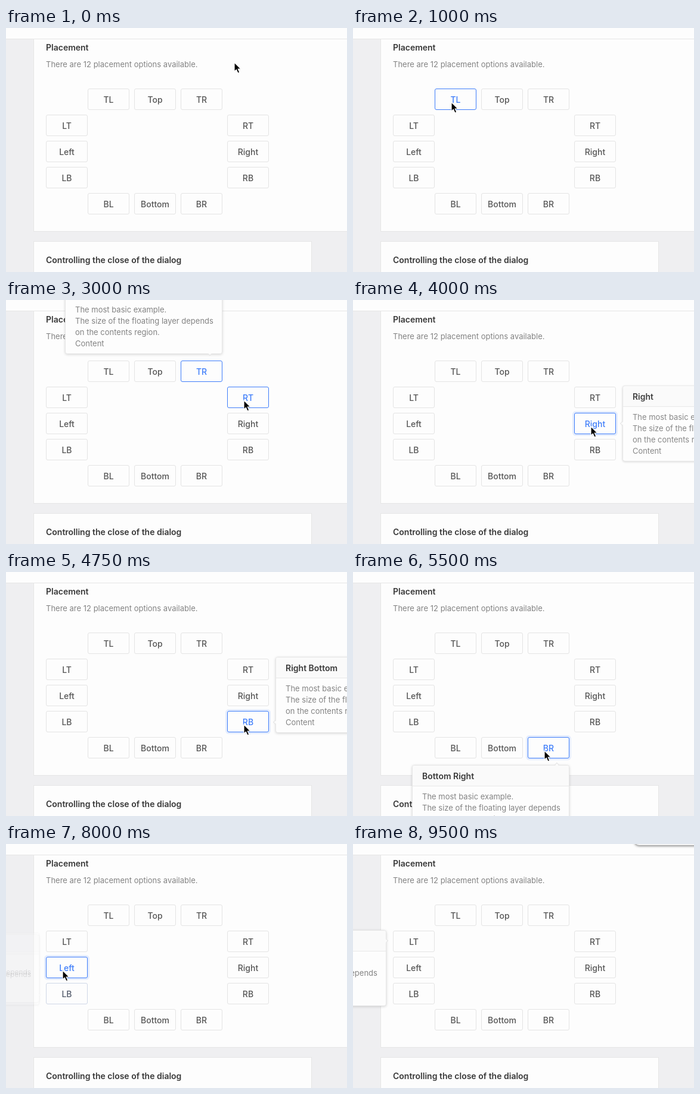
An HTML page for the animation above (10 s loop, 572 by 411 pixels).

```html
<!DOCTYPE html>
<html lang="en">
<head>
<meta charset="utf-8">
<title>Placement</title>
<style>
  * { box-sizing: border-box; }
  html, body { margin: 0; width: 100%; height: 100%; overflow: hidden; }
  body { position: relative; background: #efeff1; font: 13px/20px Inter, sans-serif; color: #838383; }
  body * { position: absolute; white-space: nowrap; }
  .bar { left: 0; top: 0; width: 572px; height: 19px; background: #fdfdfd; border-bottom: 1px solid #e6e6e6; }
  .card { left: 46px; background: #fdfdfd; border: 1px solid #e6e6e6; }
  b { font-size: 14px; font-weight: 600; color: #383838; }
  .button { width: 70px; height: 36px; border: 1px solid; border-radius: 3px; background: #fdfdfd; text-align: center; font-size: 14px; font-weight: 500; line-height: 36px; }
  .popup { width: 264px; height: 128px; border: 1px solid #e6e6e6; border-radius: 4px; background: #fdfdfd; box-shadow: 0 1px 4px rgba(0, 0, 0, .16); }
  .popup b { left: 0; top: 0; width: 100%; height: 35px; padding-left: 16px; line-height: 36px; background: #fafafa; border-bottom: 1px solid #e8e8e8; border-radius: 4px 4px 0 0; }
  .popup p { left: 16px; top: 43px; margin: 0; line-height: 19px; white-space: pre; }
  .arrow { width: 6px; height: 6px; margin: -4px; background: #fafafa; border: 1px solid #e3e3e3; transform: rotate(45deg); }
  .cover { inset: 0; background: inherit; border-radius: 4px; }
  .panel { left: 472px; top: -38px; width: 140px; height: 40px; border-radius: 8px; background: #f4f4f4; box-shadow: 0 1px 4px rgba(0, 0, 0, .6); }
</style>
</head>
<body>
<div class="card" style="top:0;width:600px;height:343px"></div>
<div class="card" style="top:359px;width:467px;height:80px"></div>
<div class="bar"></div>
<b style="left:67px;top:23px">Placement</b>
<span style="left:67px;top:51px">There are 12 placement options available.</span>
<b style="left:67px;top:381px">Controlling the close of the dialog</b>
<div id="buttons"></div>
<div id="popups"></div>
<div class="panel" id="panel"></div>
<svg id="cursor" width="16" height="23" viewBox="-2 -2 16 23" style="left:-2px;top:-2px">
  <path d="M0 0V15.2L3.4 12.2 6 18 8.8 16.8 6.3 11.2H11Z" fill="#000" stroke="#fff" stroke-width="1.2"/>
</svg>
<script>
const LOOP = 10000, STEP = 250, BLUR_AT = 9300;
const FIRST_CLICK = 950, CLICK_GAP = 690, OPEN_DELAY = 130, FADE = 200;
const BLUE = [62, 125, 250], TEXT = [85, 85, 85], LINE = [228, 228, 228];
const BODY = 'The most basic example.\nThe size of the floating layer depends\non the contents region.\nContent';
const SIDES = ['Top', 'Right', 'Bottom', 'Left'];

const clamp = v => Math.max(0, Math.min(1, v));
const smooth = p => p * p * (3 - 2 * p);
const mix = (a, b, p) => `rgb(${a.map((v, i) => Math.round(v + (b[i] - v) * p))})`;
const place = (x, y) => `left:${x}px;top:${y}px;`;

function add(parent, className, style, text = '', tag = 'div') {
  const el = document.createElement(tag);
  el.className = className;
  el.textContent = text;
  el.style.cssText = style;
  return parent.appendChild(el);
}

// Twelve options, clockwise from the top left; slot is 0, 1 or 2 along its side
const items = Array.from({ length: 12 }, (_, i) => {
  const side = Math.floor(i / 3);
  const slot = side < 2 ? i % 3 : 2 - i % 3;
  const upright = side % 2 === 0;
  const after = side === 1 || side === 2;      // popup lies right of or below its button
  const align = (upright ? ['Left', '', 'Right'] : ['Top', '', 'Bottom'])[slot];
  const name = SIDES[side];

  const x = upright ? 137 + 78 * slot : after ? 371 : 67;
  const y = upright ? (after ? 278 : 102) : 146 + 44 * slot;
  const button = add(buttons, 'button', place(x, y), align ? name[0] + align[0] : name);

  const near = `${slot * 50}%`, far = after ? '0%' : '100%';
  const at = upright
    ? place(Math.round(136 - 18.5 * slot), after ? 325 : -37)
    : place(after ? 452 : -208, 145 - slot);
  const origin = upright ? `${near} ${far}` : `${far} ${near}`;
  const popup = add(popups, 'popup', `${at}transform-origin:${origin}`);
  const edge = after ? 0 : upright ? 127 : 263;
  add(popup, 'arrow', upright ? place(21 + 111 * slot, edge) : place(edge, 18 + 46 * slot));
  add(popup, 'cover', '');
  add(popup, '', '', `${name} ${align}`, 'b');
  add(popup, '', '', BODY, 'p');

  const click = FIRST_CLICK + CLICK_GAP * i;
  const next = i < 11 ? click + CLICK_GAP : Infinity;
  return { x, y, button, popup, click, next, blur: Math.min(next, BLUR_AT) };
});

// The pointer rests on each button around its click, then glides to the next
const path = [[0, 383, 58]];
for (const { x, y, click } of items) {
  path.push([click - 40, x + 28, y + 23], [click + 420, x + 28, y + 23]);
}
path.push([9450, 590, -30]);

function pointer(t) {
  const k = path.findIndex(p => p[0] > t);
  if (k < 0) return path[path.length - 1].slice(1);
  const [t0, x0, y0] = path[k - 1], [t1, x1, y1] = path[k];
  const p = smooth((t - t0) / (t1 - t0));
  return [x0 + (x1 - x0) * p, y0 + (y1 - y0) * p];
}

function draw(t) {
  const [px, py] = pointer(t);
  cursor.style.transform = `translate(${Math.round(px)}px,${Math.round(py)}px)`;
  panel.style.visibility = t > BLUR_AT ? 'visible' : 'hidden';

  for (const { x, y, button, popup, click, next, blur } of items) {
    const hover = px >= x && px < x + 70 && py >= y && py < y + 36;
    const focus = t < click ? 0 : 1 - clamp((t - blur) / FADE);
    const blue = hover ? 1 : focus ** 1.5;
    button.style.color = mix(TEXT, BLUE, blue);
    button.style.borderColor = mix(LINE, BLUE, blue);

    const age = t - click - OPEN_DELAY;
    const ring = age < 0 || t >= blur ? 0 : 1 - clamp((age - 320) / FADE);
    button.style.boxShadow = `0 0 0 3px rgba(62,125,250,${.12 * ring})`;

    const shown = t < next ? 1 - (1 - clamp(age / FADE)) ** 2 : 1 - clamp((t - next) / FADE);
    popup.style.visibility = shown > 0 ? 'visible' : 'hidden';
    popup.style.opacity = shown;
    popup.style.transform = shown < 1 ? `scale(${.9 + .1 * shown})` : 'none';
  }
}

const start = performance.now();
function tick() {
  const t = (performance.now() - start) % LOOP;
  draw(Math.floor(t / STEP) * STEP);
  requestAnimationFrame(tick);
}
tick();
</script>
</body>
</html>
```
